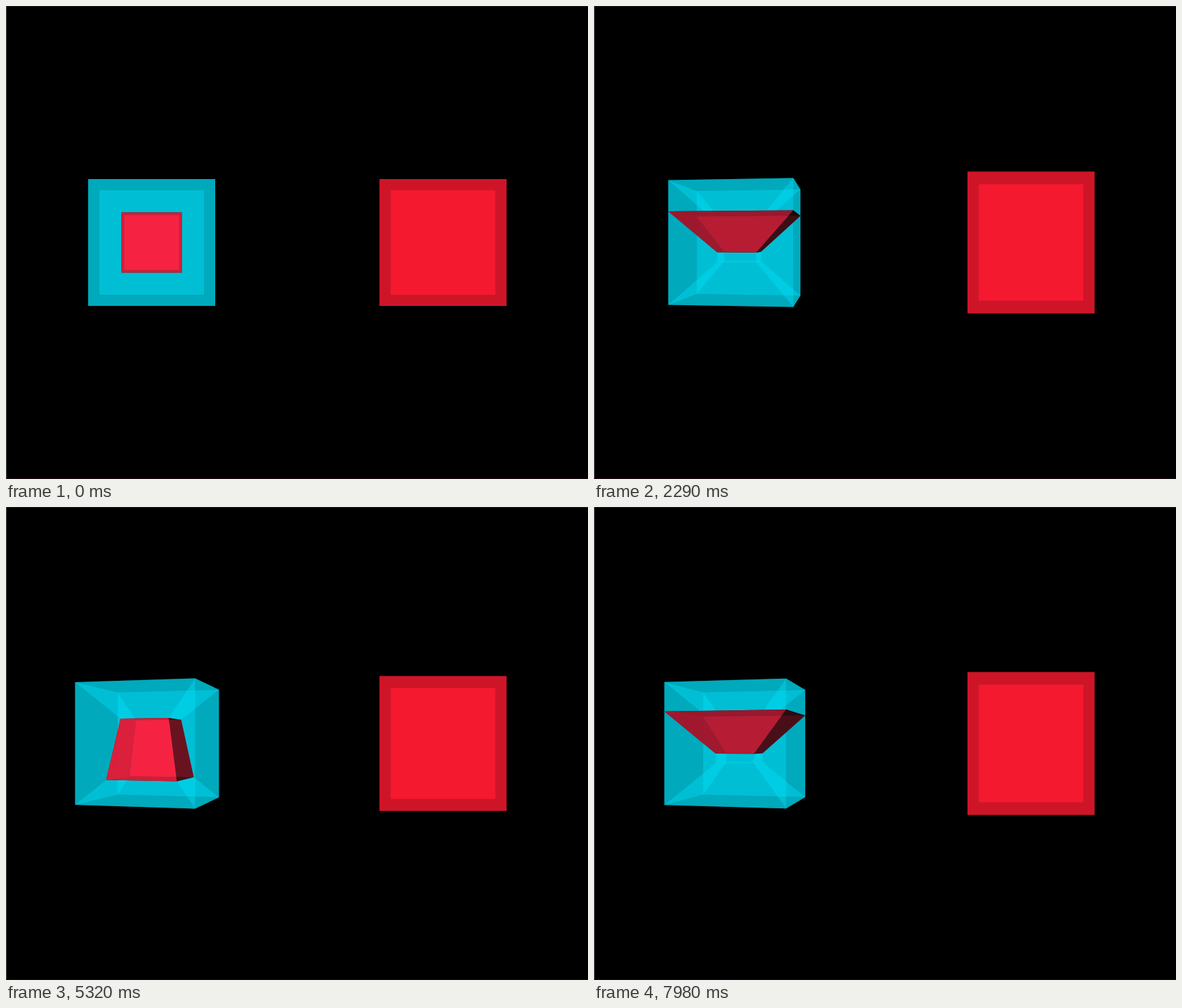
An HTML page with a canvas for the animation above (8000 ms loop, 829 by 675 pixels).

```html
<!DOCTYPE html>
<html>
<head>
<meta charset="utf-8">
<style>
  html, body { margin: 0; width: 100%; height: 100%; overflow: hidden; background: #000; }
  canvas { display: block; }
</style>
</head>
<body>
<canvas id="stage" width="829" height="675"></canvas>
<script>
const ctx = document.getElementById('stage').getContext('2d');
const LOOP = 8000, FOCAL = 842.7, CAMERA = 10.31;
const LEFT_X = 207.5, RIGHT_X = 622.5, MID_Y = 337.5;
const CORNERS = [[-1, -1], [1, -1], [1, 1], [-1, 1]];

// [ms, degrees] of the slicing hyperplane's turn in the y-w plane
const TURN = [[0, 0], [830, 14.5], [1420, 34.3], [1660, 42.3], [2490, 70], [3340, 96.5],
              [4230, 125], [5320, 160], [6680, 203], [LOOP, 243]];

function turnAt(ms) {
  const i = TURN.findIndex(([t]) => t > ms);
  const [t0, a0] = TURN[i - 1], [t1, a1] = TURN[i];
  return (a0 + (a1 - a0) * (ms - t0) / (t1 - t0)) * Math.PI / 180;
}

// Square faces of the n-dimensional cube with corners at -1 and 1
function cubeFaces(n) {
  const faces = [];
  for (let a = 0; a < n; a++) for (let b = a + 1; b < n; b++) {
    const fixed = [...Array(n).keys()].filter(k => k !== a && k !== b);
    for (let bits = 0; bits < 1 << fixed.length; bits++) {
      faces.push(CORNERS.map(([p, q]) => {
        const v = Array(n);
        v[a] = p;
        v[b] = q;
        fixed.forEach((k, i) => v[k] = bits >> i & 1 ? 1 : -1);
        return v;
      }));
    }
  }
  return faces;
}
const CUBE = cubeFaces(3), TESSERACT = cubeFaces(4);

function from4D([x, y, z, w]) {
  const k = 1 / (2 - w);
  return [x * k, y * k, z * k];
}

function yaw([x, y, z], angle) {
  const c = Math.cos(angle), s = Math.sin(angle);
  return [x * c - z * s, y, x * s + z * c];
}

function fillFace(points, centerX, color) {
  ctx.beginPath();
  for (const [x, y, z] of points) {
    const scale = FOCAL / (CAMERA - z);
    ctx.lineTo(centerX + x * scale, MID_Y - y * scale);
  }
  ctx.fillStyle = color;
  ctx.fill();
}

function normal([a, b, , d]) {
  const u = b.map((v, i) => v - a[i]), v = d.map((e, i) => e - a[i]);
  const n = [u[1] * v[2] - u[2] * v[1], u[2] * v[0] - u[0] * v[2], u[0] * v[1] - u[1] * v[0]];
  const length = Math.hypot(...n);
  return n.map(e => e / length);
}

// Convex translucent solid lit from the viewer: far faces first, then near ones
function drawLitSolid(faces, centerX, rgb) {
  const center = [0, 1, 2].map(i =>
    faces.flat().reduce((sum, p) => sum + p[i], 0) / (faces.length * 4));
  const shaded = faces.map(points => {
    const n = normal(points), p = points[0];
    const dot = q => n.reduce((sum, e, i) => sum + e * (q[i] - p[i]), 0);
    const light = Math.min(1, 0.02 + 1.04 * Math.abs(n[2]));
    const color = `rgba(${rgb.map(c => Math.round(c * light))},0.805)`;
    return { points, color, near: dot([0, 0, CAMERA]) * dot(center) < 0 };
  });
  for (const side of [false, true])
    for (const f of shaded) if (f.near === side) fillFace(f.points, centerX, f.color);
}

function draw(ms) {
  const turn = turnAt(ms), tilt = 0.3 * Math.sin(turn / 2);
  const c = Math.cos(turn), s = Math.sin(turn);
  const reach = 1 / Math.max(Math.abs(c), Math.abs(s));

  ctx.fillStyle = '#000';
  ctx.fillRect(0, 0, 829, 675);

  for (const face of TESSERACT)
    fillFace(face.map(v => yaw(from4D(v), tilt)), LEFT_X, 'rgba(0,229,255,0.355)');

  const slice = CUBE.map(face => face.map(([x, y, z]) => [x, y * reach, z]));
  const embed = ([x, u, z]) => yaw(from4D([x, u * c, z, u * s]), tilt);
  drawLitSolid(slice.map(face => face.map(embed)), LEFT_X, [255, 29, 60]);
  drawLitSolid(slice, RIGHT_X, [255, 27, 50]);

  ctx.fillStyle = '#1c1c1c';
  ctx.fillRect(0, 0, 829, 1);
  ctx.fillStyle = '#484848';
  ctx.fillRect(0, 0, 1, 675);
  ctx.fillStyle = '#1c0c0e';
  ctx.fillRect(0, 674, 829, 1);
}

function tick() {
  draw(performance.now() % LOOP);
  requestAnimationFrame(tick);
}
tick();
</script>
</body>
</html>
```
